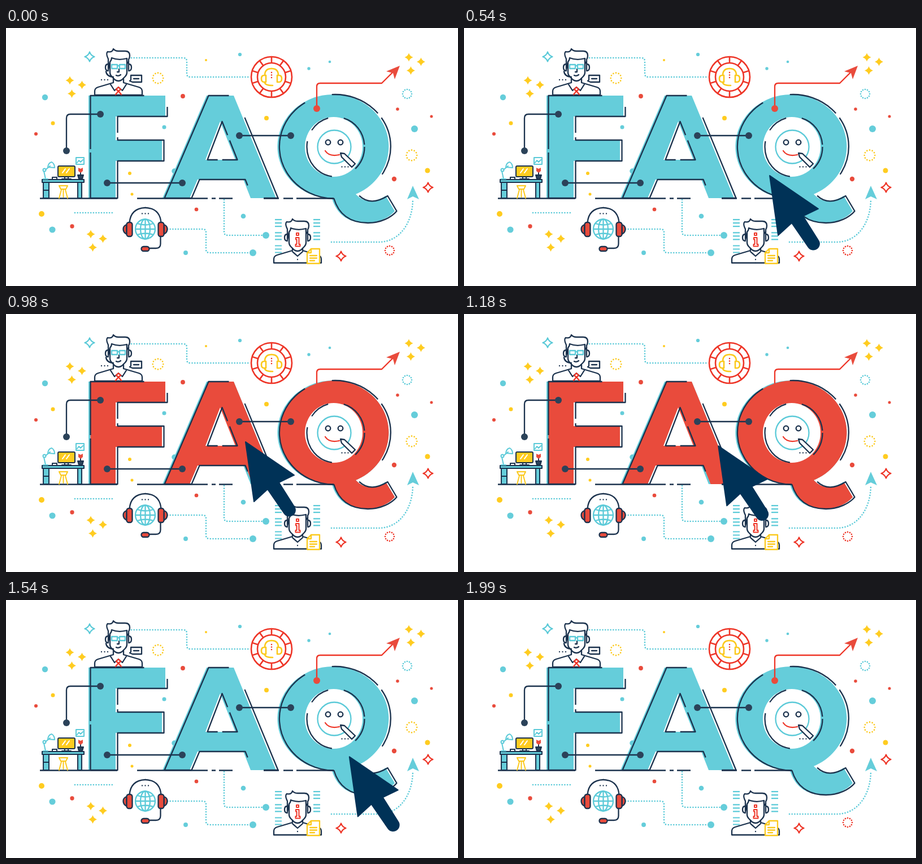
An HTML page that plays this animation: 800x458 px, repeating every 2.82 s.

```html
<!DOCTYPE html>
<html lang="en">
<head>
<meta charset="utf-8">
<title>FAQ</title>
<style>
html, body { margin: 0; width: 100%; height: 100%; overflow: hidden; background: #fff; }
svg { display: block; width: 100%; height: 100%; }
.line { fill: none; stroke-width: 2.3; stroke-linecap: round; stroke-linejoin: round; }
.cut { stroke-linecap: butt; }
.navy { stroke: #1b324d; }
.cyan { stroke: #5bcad8; }
.red { stroke: #ee3527; }
.yellow { stroke: #fbc91d; }
.dotted { stroke-width: 2.7; stroke-dasharray: 0 4.7; }
.white { fill: #fff; }
.fill-navy { fill: #2b4259; }
.fill-cyan { fill: #65cdda; }
.fill-red { fill: #e94b3c; }
.fill-yellow { fill: #ffcc20; }
</style>
</head>
<body>
<svg viewBox="0 0 800 458">
<defs>
  <path id="F" d="M146 120H282V157H194V199H276V236H194V302H146Z"/>
  <path id="A" d="M355 120H403L478 302H433L420 269H339L325 302H277Z"/>
  <path id="Q" d="M577 303C585 330 605 346 637 346C660 346 679 336 688 325L672 298
    Q640 318 619 295A98.5 92.5 0 1 0 577 303Z"/>
  <path id="holeA" d="M379 166L406 234H353Z"/>
  <path id="holeQ" d="M631 211A51 53 0 1 0 529 211A51 53 0 1 0 631 211Z"/>
  <g id="letters"><use href="#F"/><use href="#A"/><use href="#Q"/></g>
  <clipPath id="inside"><use href="#F" x="3.5"/><use href="#A" x="3.5"/><use href="#Q" x="3.5"/></clipPath>

  <marker id="joint" markerUnits="userSpaceOnUse" overflow="visible"><circle class="fill-navy" r="6"/></marker>
  <marker id="cyanEnd" markerUnits="userSpaceOnUse" overflow="visible"><circle class="fill-cyan" r="6"/></marker>
  <marker id="redEnd" markerUnits="userSpaceOnUse" overflow="visible"><circle class="fill-red" r="6"/></marker>

  <!-- Halves are mirrored to make the symmetric shapes. -->
  <g id="halfHead">
    <path class="white" d="M0 -18H-15V9Q-15 13 -12 16L-6 22Q-3 24 0 24"/>
    <path d="M-18 -6Q-23 -6 -23 0T-18 6"/>
  </g>
  <g id="head">
    <use href="#halfHead"/><use href="#halfHead" transform="scale(-1 1)"/>
    <path class="white" d="M-18 4V-15Q-23 -25 -19 -28Q-11 -26 -9 -33Q-6 -29 0 -29H12Q20 -29 20 -21Q20 -17 18 -14V4V-6L15 -11V-16Q0 -12 -12 -17Q-12 -13 -15 -10Z"/>
  </g>
  <path id="halfShoulders" class="white" d="M0 0H-42V-7Q-42 -12 -36 -14L-9 -22V-29"/>
  <g id="shoulders"><use href="#halfShoulders"/><use href="#halfShoulders" transform="scale(-1 1)"/></g>
  <g id="halfHeadset">
    <path d="M0 -38Q-26 -37 -28 -11"/>
    <path class="fill-red" d="M-33 -8Q-39 -6 -39 0T-33 9Z"/>
    <rect class="fill-red" x="-33" y="-12" width="10" height="25" rx="4"/>
  </g>
  <path id="halfSmallHeadset" d="M0 -15Q-12 -15 -12 -3H-13Q-18 -3 -18 3T-13 9H-10V-3"/>
</defs>

<g id="scatter"></g>

<g class="line cyan dotted">
  <path d="M222 53H313Q320 53 320 59V81Q320 87 326 87H430"/>
  <path d="M122 328H189"/>
  <path marker-end="url(#cyanEnd)" d="M286 357H348Q354 357 354 363V393Q354 399 360 399H437"/>
  <path marker-end="url(#cyanEnd)" d="M386 305V362Q386 368 392 368H460"/>
  <path d="M576 380H660C697 380 720 345 720 304"/>
</g>
<path class="fill-cyan" d="M720 280L731 304L720 299L710 304Z"/>

<use href="#letters" class="fill-cyan"/>
<path class="line red" marker-start="url(#redEnd)" d="M550 143V104Q550 98 556 98H665L687 76"/>
<path class="fill-red" d="M697 67L673 77L685 80L688 91Z"/>
<g id="hover" clip-path="url(#inside)"><use href="#letters" class="fill-red"/></g>
<g class="white"><use href="#holeA"/><use href="#holeQ"/></g>

<!-- Letter outlines: the same shapes shifted right, with gaps -->
<g class="line cut navy">
  <g transform="translate(3.5)">
    <use href="#F" stroke-dasharray="95 61 134 8 401 6 95"/>
    <use href="#A" stroke-dasharray="36 54 180 44 400"/>
    <use href="#Q" stroke-dasharray="223 60 107 10 91 50 300"/>
    <use href="#holeA" stroke-dasharray="26 10 64 8 91"/>
    <use href="#holeQ" stroke-dasharray="0 4 63 28 37 21 85 45 50"/>
  </g>
  <path d="M60 302.5H580" stroke-dasharray="137 35 125 7 7 6 24 55 27 8 17 6 66"/>
</g>

<g class="line navy" marker-start="url(#joint)" marker-end="url(#joint)">
  <path d="M107 218V160Q107 153 114 153H167"/><path d="M179 275H312"/><path d="M413 191H504"/>
</g>

<!-- Smiling face and pencil -->
<g class="line navy">
  <circle class="cyan" cx="581" cy="211" r="29.5"/>
  <circle cx="570" cy="203" r="4.3"/><circle cx="592" cy="203" r="4.3"/>
  <path class="red" d="M565 218Q572 229 590 225"/>
  <path class="white" d="M592 222L599 223L618 241L612 247L594 229Z"/>
  <path d="M594.5 246.5h12" stroke-dasharray="0 5.5"/>
</g>

<!-- Man with glasses -->
<g class="line navy">
  <use href="#shoulders" x="199" y="119"/>
  <use href="#head" x="199" y="70"/>
  <path d="M177 77Q178 86 190 87M200 73V78H197M195 84Q199 86 203 83M185 100L192 111L199 105L206 111L213 100"/>
  <path class="cyan" d="M187 65h10v7h-10zM201 65h10v7h-10zM197 67h4"/>
  <path class="red" d="M199 105L203 109L199 112L195 109ZM199 112L194 118M199 112L204 118"/>
  <path class="white" d="M221 84H240V96H224L219 94L221 92Z"/>
  <path d="M226 90H235"/>
  <path d="M169 92h12" stroke-dasharray="0 5.5"/>
</g>

<!-- Help ring -->
<g class="line red" transform="translate(470 87)" style="stroke-width:2.6">
  <circle r="36"/><circle r="25"/>
  <g id="spokes" class="cut"></g>
  <path d="M0 -8V2" stroke-dasharray="0 4.5"/>
  <g class="yellow"><use href="#halfSmallHeadset"/><use href="#halfSmallHeadset" transform="scale(-1 1)"/>
    <path d="M-12 10Q-11 15 2 15"/></g>
</g>

<!-- Desk -->
<g class="line navy" style="stroke-width:2">
  <path class="fill-cyan" d="M64 269H138V274H64ZM66 274H76V302H66ZM127 274H134V302H127Z"/>
  <path d="M66 288H76M104 264V268M110 264V268M99 268H115M82 268V265H90V268"/>
  <rect class="fill-yellow" x="92" y="245" width="30" height="19" rx="2"/>
  <path style="stroke:#fff" d="M100 257L105 250M107 257L112 250"/>
  <path class="yellow" d="M94 280H109L106 286H97ZM98 287L94 302M105 287L109 302M101.5 287V300"/>
  <path class="cyan" d="M66 268H74M70 268L67 254L78 245M74 247Q75 239 81 238Q86 241 86 248ZM124 230H138V242H124ZM126 239L129 235L132 238L136 234"/>
  <circle class="cyan white" cx="68" cy="252" r="2.5"/>
  <path class="fill-navy" d="M127 261H137L135 268H129ZM132 261V256"/>
  <path class="fill-red" stroke="none" d="M128 248L132 250L136 248V254L132 257L128 254Z"/>
</g>

<!-- Headset and globe -->
<g class="line navy" transform="translate(246.500 357)">
  <g class="cyan"><circle r="17.5"/><ellipse rx="8.5" ry="17.5"/>
    <path d="M0 -17V17M-17 0H17M-14 -10Q0 -5 14 -10M-14 10Q0 5 14 10"/></g>
  <use href="#halfHeadset"/><use href="#halfHeadset" transform="scale(-1 1)"/>
  <path d="M27 13V26Q27 34 19 34H8"/>
  <rect class="fill-red" x="-7" y="31" width="14" height="8" rx="4"/>
  <path d="M-5.500 -27.500h12M0 -22h0" stroke-dasharray="0 5.5"/>
</g>

<!-- Information agent -->
<g class="line navy">
  <path class="cyan cut" style="stroke-width:12" stroke-dasharray="2.200 3.800 2.200 3.800 2.200 9" d="M482 339V400M550 339V377"/>
  <use href="#shoulders" x="516" y="417"/>
  <use href="#head" x="516" y="372"/>
  <path d="M507 397L516 405L525 397M516 411h0"/>
  <path class="red" d="M514 364h4v4h-4zM513 372h5.500V384h2v3.500h-8V384h2V375.500h-1.500z" style="stroke-width:2"/>
  <path class="yellow white" d="M540 392H555V418H533V399ZM540 392V399H533M538 404H550M538 408.500H550M538 413H546"/>
</g>

<path id="cursor" fill="#003257" stroke="#003257" stroke-width="2" stroke-linejoin="round"
  d="M1 1L16 107L40 85L69.500 128A10.300 10.300 0 0 0 87 116L60 73L87 60Z"/>
</svg>

<script>
const get = id => document.getElementById(id);
const circle = (x, y, r, attrs) => `<circle cx="${x}" cy="${y}" r="${r}" ${attrs}/>`;

function star(x, y, r, attrs) {
  const k = r / 4;
  return `<path transform="translate(${x} ${y})" ${attrs} d="M0 ${-r}Q${k} ${-k} ${r} 0Q${k} ${k} 0 ${r}Q${-k} ${k} ${-r} 0Q${-k} ${-k} 0 ${-r}Z"/>`;
}

// Dots of one colour shrink evenly from the first place to the last.
function shrinkingDots(color, from, to, places) {
  return places.map(([x, y], i) =>
    circle(x, y, from + (to - from) * i / (places.length - 1), `class="fill-${color}"`)).join('');
}

function starCluster(x, y) {
  return [[0, 0], [21.5, 8], [3.5, 23.5]]
    .map(([dx, dy]) => star(x + dx, y + dy, 7.5, 'class="fill-yellow"')).join('');
}

const outlineStar = (x, y, color) => star(x, y, 8.5, `class="line ${color}"`);

// The path length fits exactly twelve dots.
const dottedRing = (x, y, r, color) => circle(x, y, r, `class="line dotted ${color}" pathLength="56.4"`);

get('scatter').innerHTML = [
  shrinkingDots('cyan', 6, 2.3, [[723, 179], [82, 358], [69, 123], [298, 254], [420, 334], [318, 399], [280, 176], [414, 47], [536, 72], [573, 60]]),
  shrinkingDots('red', 4.2, 2.5, [[687, 268], [313, 121], [117, 352], [337, 322], [53, 188], [693, 144], [753, 157]]),
  shrinkingDots('yellow', 5, 2, [[63, 330], [746, 253], [461, 160], [83, 169], [219, 258], [223, 295], [354, 57]]),
  starCluster(113, 93), starCluster(713, 52), starCluster(150, 366),
  outlineStar(148, 51, 'cyan'), outlineStar(747, 283, 'red'), outlineStar(593, 405, 'red'),
  dottedRing(269, 89, 9.3, 'yellow'), dottedRing(718, 226, 9.3, 'yellow'),
  dottedRing(710, 117, 8, 'cyan'), dottedRing(679, 395, 8, 'red')
].join('');

const SPOKES = 10;
get('spokes').innerHTML = Array.from({ length: SPOKES },
  (_, i) => `<path d="M0 -25V-36" transform="rotate(${i * 360 / SPOKES})"/>`).join('');

const LOOP = 2820, STEP = 30;
const ARRIVE = 780, HOVER = 980, LEAVE = 1120, UNHOVER = 1500, GONE = 1990;
const REST = { x: 423, y: 226 };
const cursor = get('cursor'), hover = get('hover');

// Straight line in to the resting point, a pause, then straight out again.
function cursorPosition(time) {
  const inward = Math.max(0, Math.ceil((ARRIVE - time) / STEP));
  const outward = Math.max(0, Math.floor((time - LEAVE) / STEP));
  return [REST.x + 14.63 * inward + 13.13 * outward, REST.y + 4.37 * inward + 3.67 * outward];
}

function draw(now) {
  const time = now % LOOP;
  cursor.setAttribute('transform', `translate(${cursorPosition(time)})`);
  cursor.style.display = time >= STEP && time < GONE ? '' : 'none';
  hover.style.display = time >= HOVER && time < UNHOVER ? '' : 'none';
}

let start;
function frame(now) {
  start ??= now;
  draw(now - start);
  requestAnimationFrame(frame);
}
draw(0);
requestAnimationFrame(frame);
</script>
</body>
</html>
```
